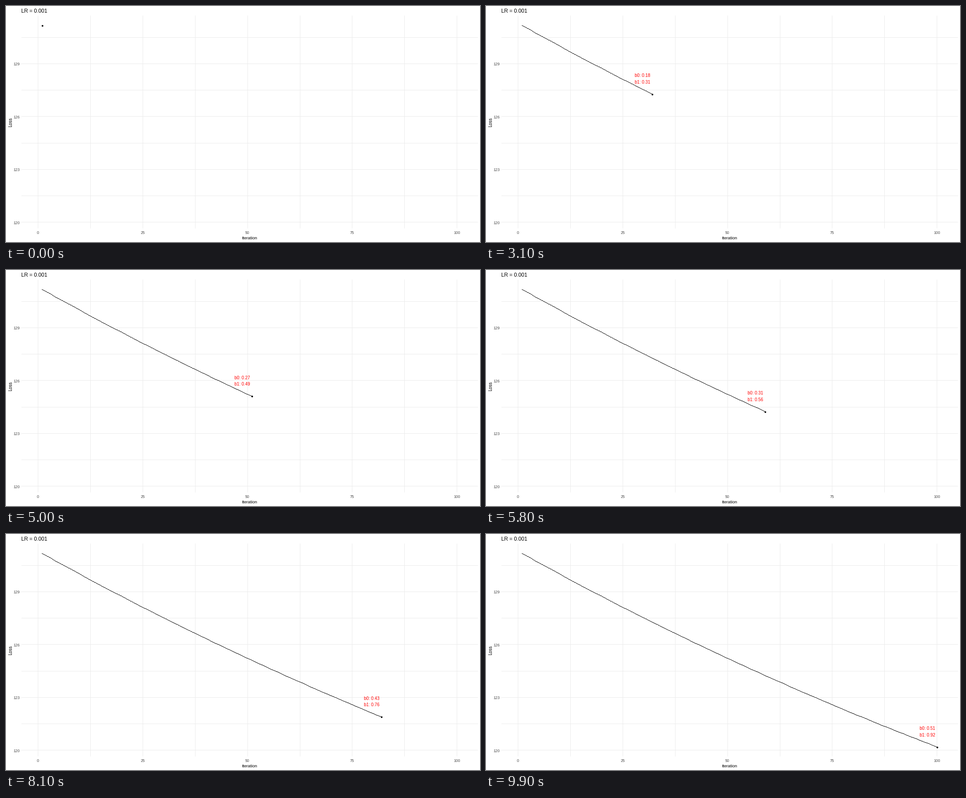
A matplotlib script that plays this animation: 1058 px wide and 529 px high, repeating every 10 s.

```python
import numpy as np
import matplotlib.pyplot as plt
from matplotlib.animation import FuncAnimation
from matplotlib.collections import LineCollection
from matplotlib.transforms import Bbox

W, H, DPI = 1058, 529, 100
PX = 72 / DPI  # points per pixel
LEFT, TOP, RIGHT, BOTTOM = 34, 21, 1053, 498  # plot panel
STEPS = 100

plt.rcParams["font.family"] = "Liberation Sans"


def x_px(iteration):
    return 71.25 + 9.349 * iteration


def y_px(loss):
    return 128.9 + 39.5 * (129 - loss)


def loss_px(iteration):
    """Height of the exponentially falling loss, in pixels from the top."""
    return 43.5 + 1383 * (1 - np.exp(-0.0038 * (iteration - 1)))


def coefficient(limit, iteration):
    return limit * (1 - np.exp(-0.0019 * iteration))


fig = plt.figure(figsize=(W / DPI, H / DPI), dpi=DPI, facecolor="white")
ax = fig.add_axes([0, 0, 1, 1])
ax.set_xlim(0, W)
ax.set_ylim(H, 0)
ax.axis("off")


def label(x, y, text, size, color="black", **kw):
    return ax.text(x, y, text, fontsize=size * PX, color=color,
                   va="baseline", **kw)


def grid_line(xs, ys):
    ax.plot(xs, ys, color="#EBEBEB", lw=PX, solid_capstyle="butt", zorder=1)


for v in np.arange(0, 101, 12.5):
    grid_line([x_px(v)] * 2, [TOP, BOTTOM])
for v in np.arange(120, 131, 1.5):
    grid_line([LEFT, RIGHT], [y_px(v)] * 2)

for v in range(0, 101, 25):
    label(x_px(v), 510.6, str(v), 8.7, "#4D4D4D", ha="center")
for v in range(120, 130, 3):
    label(30.6, y_px(v) + 4.2, str(v), 8.7, "#4D4D4D", ha="right")

label(34, 15, "LR = 0.001", 11.8, ha="left")
label(543.2, 523, "Iteration", 9.5, ha="center")
label(13.5, 260.5, "Loss", 10, ha="center", rotation=90,
      rotation_mode="anchor")

# The curve joins whole pixels, one per column, without smoothing.
iters = np.arange(1, STEPS + 1)
xs = np.floor(x_px(iters))
ys = np.floor(loss_px(iters))
cols = np.arange(xs[0], xs[-1] + 1)
rows = np.round(np.interp(cols, xs, ys))
cells = [[(c + 0.5, r), (c + 0.5, r + 1)] for c, r in zip(cols, rows)]

curve = LineCollection([], colors="black", linewidths=PX, zorder=3)
curve.set_snap(False)
ax.add_collection(curve, autolim=False)
dot, = ax.plot([], [], "o", color="black", ms=3.8 * PX, mew=0, zorder=4)

panel = Bbox.from_extents(LEFT, H - BOTTOM, RIGHT, H - TOP)
notes = [label(0, 0, "", 9.7, "red", ha="left", clip_on=True, zorder=5)
         for _ in range(2)]
for note in notes:
    note.set_clip_box(panel)


def update(n):
    curve.set_segments(cells[:int(xs[n] - xs[0])])
    dot.set_data([xs[n] + 0.5], [ys[n] + 0.5])
    for k, (limit, rise) in enumerate([(2.97, 38), (5.295, 23.5)]):
        value = coefficient(limit, iters[n])
        notes[k].set_text(f"b{k}: {value:.2f}")
        notes[k].set_position((x_px(iters[n]) - 38.5,
                               loss_px(iters[n]) - rise))
    return [curve, dot, *notes]


anim = FuncAnimation(fig, update, frames=STEPS, interval=100, repeat=True,
                     repeat_delay=0, blit=False)
plt.show()
```
